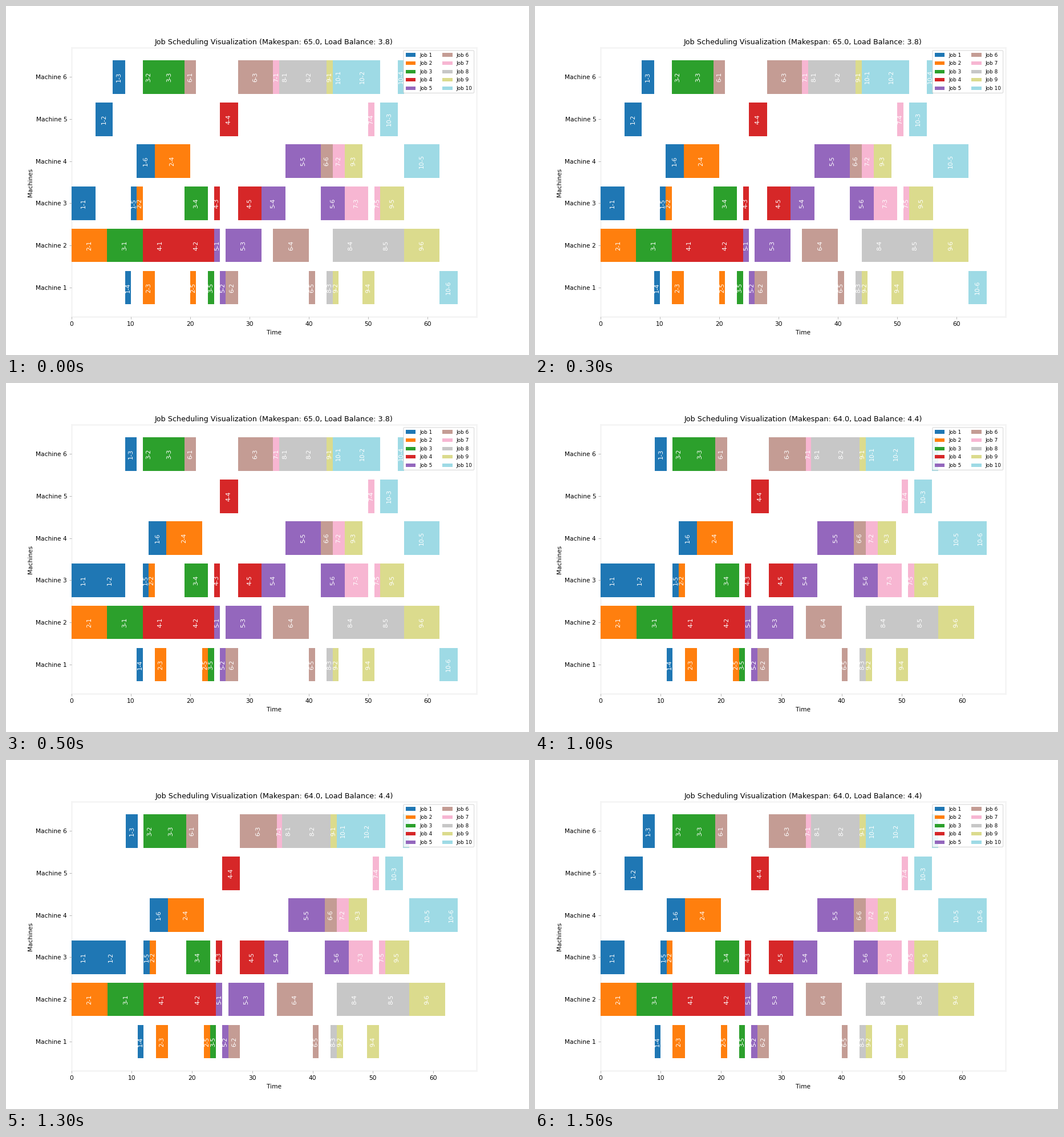
Recreate the animation shown at these times as a matplotlib script. Size 917 by 611 pixels, loop 2000 ms.

```python
import matplotlib.pyplot as plt
import numpy as np
from matplotlib.animation import FuncAnimation
from matplotlib.patches import FancyBboxPatch, Rectangle
from matplotlib.transforms import Affine2D

W, H, DPI = 917, 611, 64
PT = 76.4 / DPI  # scales point sizes to the stage

# The chart is laid out on a 1200 x 800 grid that is fitted to the stage.
GRID_W, GRID_H = 1200, 800
AXES_W, AXES_H = 930, 616
Y_MIN, Y_MAX = 0.31, 6.69

plt.rcParams.update({
    "font.family": "DejaVu Sans",
    "font.size": 10 * PT,
    "axes.titlepad": 6 * PT,
    "axes.labelpad": 4 * PT,
    "axes.linewidth": 2.4 * PT,
    "axes.edgecolor": "#f4f4f4",
})
for axis in ("xtick", "ytick"):
    plt.rcParams.update({
        f"{axis}.major.size": 3.5 * PT,
        f"{axis}.major.pad": 3.5 * PT,
        f"{axis}.major.width": 0.8 * PT,
        f"{axis}.color": "#aaaaaa",
        f"{axis}.labelcolor": "black",
    })
plt.rcParams["xtick.major.pad"] = 4.4 * PT

# One job per line; each operation is a machine digit and a duration digit.
JOBS = [ops.split() for ops in (
    "34 53 62 11 31 43",
    "26 31 12 46 11",
    "26 62 65 34 11",
    "26 26 31 53 34",
    "21 11 26 34 46 34",
    "62 12 66 26 11 42",
    "61 42 34 51 31",
    "62 66 11 26 26",
    "61 11 43 12 34 26",
    "62 66 53 61 46 13",
)]
COLORS = plt.cm.tab20(np.linspace(0, 1, len(JOBS)))


def schedule(jobs):
    """Start every operation as soon as its job and machine are free."""
    free = [0] * 7
    bars = []
    for j, ops in enumerate(jobs):
        ready = 0
        for k, op in enumerate(ops):
            machine, length = int(op[0]), int(op[1])
            start = max(ready, free[machine])
            ready = free[machine] = start + length
            bars.append((j, k, machine, start, length))
    return bars, max(free)


def jobs_at(frame):
    jobs = [list(ops) for ops in JOBS]
    if frame in (1, 2):
        jobs[0][1] = "35"
    if frame >= 2:
        jobs[9][5] = "42"
    return jobs


def snap(value, low, high, cells):
    """Round a data value to the nearest line of the layout grid."""
    step = (high - low) / cells
    return low + round((value - low) / step) * step


fig, ax = plt.subplots(figsize=(W / DPI, H / DPI), dpi=DPI, facecolor="white")


def draw_legend():
    grid = (Affine2D().scale(W / GRID_W / DPI, -H / GRID_H / DPI)
            .translate(0, H / DPI) + fig.dpi_scale_trans)
    em = 11.574
    fig.add_artist(FancyBboxPatch(
        (912, 102), 162, 97.5, transform=grid,
        boxstyle=f"round,pad=0,rounding_size={0.2 * em}",
        fc=(1, 1, 1, 0.8), ec=(0.8, 0.8, 0.8, 0.8), lw=PT))
    for j, color in enumerate(COLORS):
        col, row = divmod(j, 5)
        x, y = 917 + 84 * col, round(116.4 + 18.79 * row)
        fig.add_artist(Rectangle((x, y - 8), 23, 8, transform=grid,
                                 fc=color, ec="none", zorder=2))
        fig.text(x + 2.8 * em, y, f"Job {j + 1}", transform=grid,
                 fontsize=8.33 * PT, va="baseline", zorder=3)


def draw(frame):
    ax.clear()
    bars, makespan = schedule(jobs_at(frame))
    x_max = makespan * 1.05
    for j, k, machine, start, length in bars:
        left, right = (snap(x, 0, x_max, AXES_W)
                       for x in (start, start + length))
        low, high = (snap(y, Y_MIN, Y_MAX, AXES_H)
                     for y in (machine - 0.4, machine + 0.4))
        ax.barh(low, right - left, left=left, height=high - low,
                align="edge", color=COLORS[j])
        ax.text(start + length / 2, machine, f"{j + 1}-{k + 1}", color="white",
                rotation=90, ha="center", va="center")
    ax.set_xlim(0, x_max)
    ax.set_ylim(Y_MIN, Y_MAX)
    ax.set_xticks(range(0, 61, 10))
    ax.set_yticks(range(1, 7), [f"Machine {m}" for m in range(1, 7)])
    ax.set_xlabel("Time", labelpad=4.8 * PT)
    ax.set_ylabel("Machines")
    balance = 3.8 if frame < 2 else 4.4
    ax.set_title(f"Job Scheduling Visualization (Makespan: {makespan:.1f}, "
                 f"Load Balance: {balance})")
    for spine in ax.spines.values():
        spine.set_zorder(0.5)
    return []


draw_legend()
anim = FuncAnimation(fig, draw, frames=4, interval=500, repeat=True,
                     repeat_delay=0, init_func=lambda: [])
plt.show()
```
